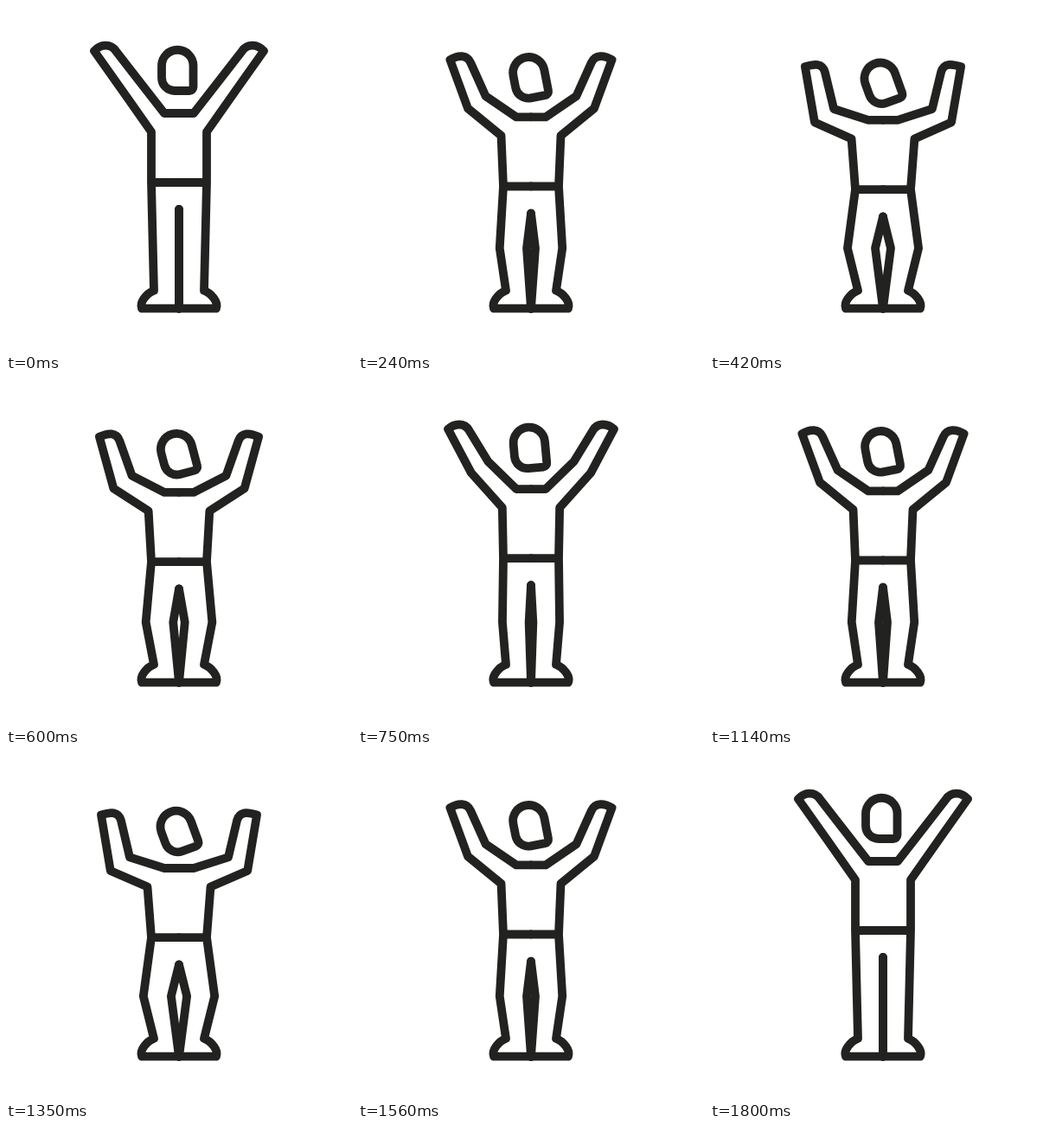
Animation, 400 px wide and 400 px high, one loop 1.83 s. Source, as an HTML page:

```html
<!DOCTYPE html>
<html lang="en">
<head>
<meta charset="utf-8">
<title>Person bouncing with raised arms</title>
<style>
  html, body { margin: 0; width: 100%; height: 100%; overflow: hidden; background: #fff; }
  svg { display: block; width: 100%; height: 100%; }
  .line { fill: none; stroke: #222221; stroke-width: 9.8; stroke-linecap: round; stroke-linejoin: round; }
</style>
</head>
<body>
<svg viewBox="0 0 400 400">
  <g class="line">
    <path id="half"/>
    <use href="#half" transform="matrix(-1 0 0 1 400 0)"/>
    <path id="head" d="M216.5 93.5V69a18.25 18.25 0 0 0-36.5 0V83a15 15 0 0 0 15 15H212a4.5 4.5 0 0 0 4.5-4.5Z"/>
  </g>
</svg>
<script>
  const LOOP = 1830, TICK = 30, BOUNCE = 900;
  const half = document.getElementById('half');
  const head = document.getElementById('head');

  // Left half of the body; bend runs from 0 (stretched) to 1 (crouched).
  function bodyPath(bend) {
    const at = (x, y, dx, dy) => `${x + dx * bend} ${y + dy * bend}`;
    const neck = at(183, 124, 0, 8);
    const hip = at(168, 204, 0, 8.2);
    const arm = [
      `M${at(200, 124, 0, 8)}L${neck}`,
      `L${at(153, 85.4, -10, 34)}`,
      `L${at(127, 52, 6, 25)}`,
      `C${at(121, 43, 9, 23)} ${at(109, 44, 12, 23)} ${at(102, 52, 8, 18.5)}`,
      `L${at(134.6, 98, -13.8, 37)}`,
      `L${at(168, 145.5, -4.5, 8)}L${hip}`
    ];
    const leg = [
      `M${at(200, 204, 0, 8.2)}L${hip}`,
      `L${at(169.8, 280, -11, 0)}L171 329`,
      'C163 332 154 342 157 349.6H200',
      `M${at(200, 235, 0, 8.5)}L${at(200, 280, -9.1, 0)}L200 350`
    ];
    return arm.concat(leg).join('');
  }

  function draw(now) {
    const time = Math.floor(now % LOOP / TICK) * TICK;
    const phase = time % BOUNCE / (BOUNCE / 2);
    const s = phase > 1 ? 2 - phase : phase;
    const bend = s * s * (3 - 2 * s);
    half.setAttribute('d', bodyPath(bend));
    head.setAttribute('transform',
      `translate(${-1.5 * bend} ${15 * bend}) rotate(${-20 * bend} 198.25 69)`);
  }

  let start;
  function loop(now) {
    start ??= now;
    draw(now - start);
    requestAnimationFrame(loop);
  }
  draw(0);
  requestAnimationFrame(loop);
</script>
</body>
</html>
```
